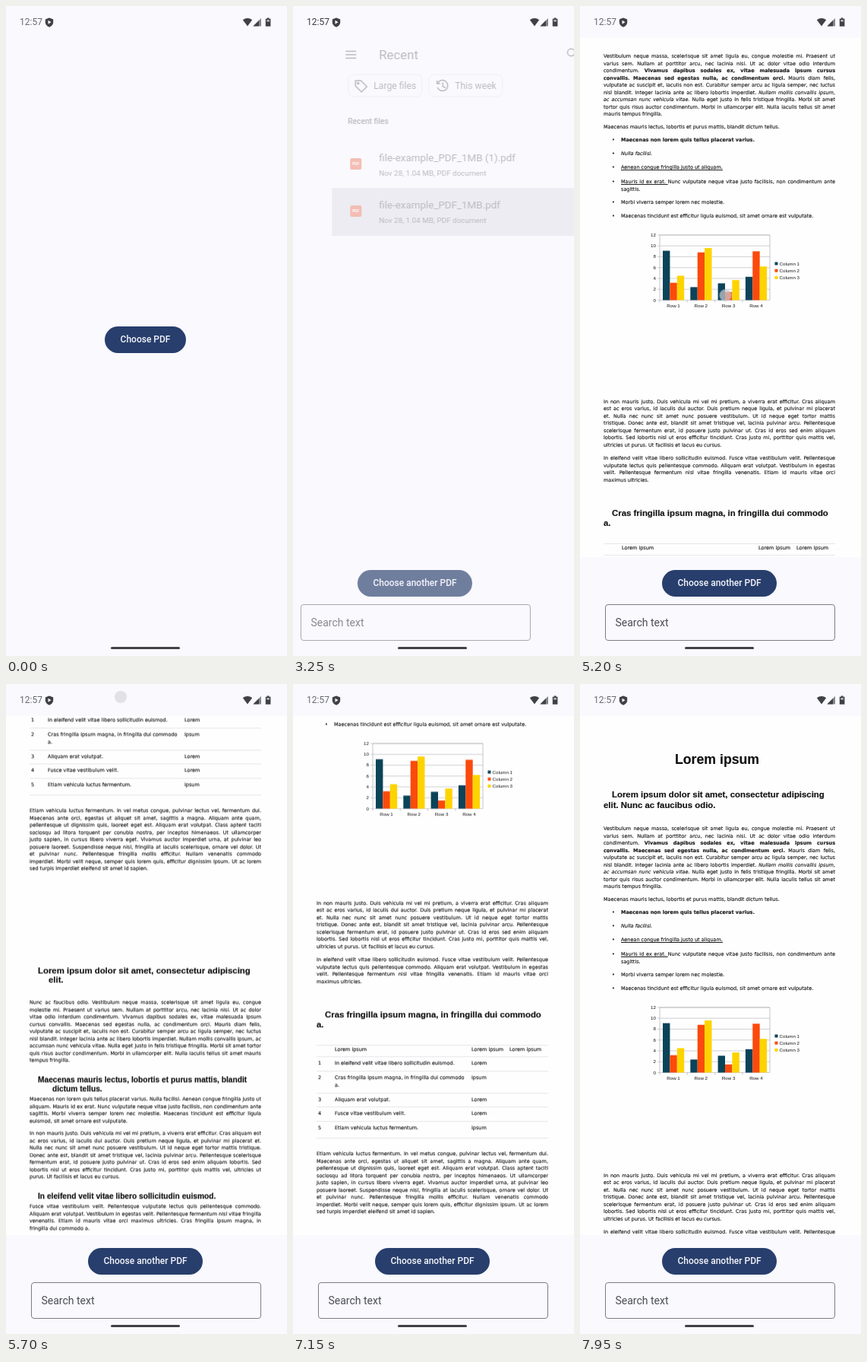
Write an HTML page that moves like this. It is 370 px wide and 854 px high and loops after 8000 ms.

```html
<!DOCTYPE html>
<html lang="en">
<head>
<meta charset="utf-8">
<title>PDF viewer demo</title>
<style>
  :root { --bg: #f9f9fe; --ink: #4c4d55; --navy: #283e6c; }
  html, body { margin: 0; width: 100%; height: 100%; overflow: hidden; background: var(--bg); }
  body { position: relative; font-family: Roboto, sans-serif; color: var(--ink); }
  body * { box-sizing: border-box; }
  svg { position: absolute; left: 0; top: 0; overflow: visible; }
  .layer { position: absolute; left: 0; top: 0; width: 370px; height: 854px; overflow: hidden; }
  .layer, .anim { animation: 8s linear infinite; }

  .button { position: absolute; height: 35px; border-radius: 18px; overflow: hidden;
    background: var(--navy); color: #f4f5fa; font: 500 12px/35px Roboto, sans-serif; text-align: center; }
  .field { position: absolute; left: 32.5px; top: 785.5px; width: 303px; height: 48px; padding-left: 13px;
    border: 1px solid #7d7e86; border-radius: 4px; font-size: 14px; line-height: 46px; }

  #home { background: var(--bg); animation-name: home; }
  #home .button { left: 130px; top: 421px; width: 107px; }
  .ripple { position: absolute; left: 46px; top: 0; width: 40px; height: 40px; border-radius: 50%;
    background: #8a87a0; opacity: 0; animation-name: ripple; }

  #app { animation-name: app; }
  #app .button { left: 108px; top: 741px; width: 151px; }
  #view { position: absolute; left: 0; top: 42px; width: 370px; height: 682px; overflow: hidden;
    background: #fefeff; animation-name: load; animation-timing-function: step-end; }
  #doc { position: absolute; left: 0; top: -42px; width: 370px; animation-name: scroll; }
  #rest { position: absolute; left: 0; top: 0; width: 370px; animation-name: gap; }

  #doc p { position: absolute; margin: 0; white-space: nowrap; color: #1c1c1e;
    font: 6.5px/10px "DejaVu Sans", sans-serif; -webkit-text-stroke: .15px; }
  #doc p.full { text-align: justify; text-align-last: justify; }
  #doc p.flow { white-space: normal; text-align: justify; line-height: 9.5px; }
  #doc p.h { font: bold 11.4px/14px "Liberation Sans", Arial, sans-serif; color: #111; }
  #doc p.sub { font-size: 10.2px; }
  #doc p.title { font-size: 17.7px; line-height: 14px; }
  #doc hr { position: absolute; left: 31px; width: 305px; height: 1px; margin: 0; border: 0; background: #e6e6ea; }

  #files { background: var(--bg); box-shadow: -90px 0 var(--bg); color: #45464e; animation-name: files; }
  #files span { position: absolute; line-height: 20px; white-space: nowrap; }
  .row { position: absolute; left: 0; top: 239px; width: 370px; height: 63px; background: #d3d4dc;
    opacity: 0; animation-name: row; }

  #status { animation-name: status; animation-timing-function: step-end; }
  #status span { position: absolute; left: 18px; top: 11px; font-size: 12px; line-height: 20px; }
  .pill { position: absolute; left: 138px; top: 842px; width: 91px; height: 3px; border-radius: 2px; background: #414248; }
  .touch { position: absolute; left: -8px; top: -8px; width: 16px; height: 16px; border-radius: 50%;
    background: #c9c9d0; opacity: 0; animation-name: touch; }

  @keyframes home {
    0%, 25% { transform: none; opacity: 1; animation-timing-function: cubic-bezier(.2, .6, .1, 1); }
    31.25%, 35% { transform: translateX(-86px); opacity: 1; }
    35.01%, 100% { transform: translateX(-86px); opacity: 0; }
  }
  @keyframes ripple {
    0%, 22.49% { opacity: 0; transform: scale(.6); }
    22.5% { opacity: .3; transform: scale(1); }
    25% { opacity: .3; transform: scale(3.2); }
    28%, 100% { opacity: 0; transform: scale(3.2); }
  }
  @keyframes files {
    0%, 25% { transform: translateX(86px); opacity: 0; animation-timing-function: cubic-bezier(.2, .6, .1, 1); }
    31.25%, 39.375% { transform: none; opacity: 1; }
    40.625% { transform: translateX(51px); opacity: .35; }
    41.6% { transform: translateX(66px); opacity: 0; }
    100% { transform: translateX(86px); opacity: 0; }
  }
  @keyframes row {
    0%, 38.12% { opacity: 0; }
    38.13% { opacity: .5; }
    39%, 45% { opacity: 1; }
    45.01%, 100% { opacity: 0; }
  }
  @keyframes app {
    0%, 35% { opacity: 0; transform: translateX(-86px); }
    35.01%, 39.375% { opacity: 1; transform: translateX(-86px); }
    40.625% { transform: translateX(-23.5px); animation-timing-function: cubic-bezier(.1, .6, .2, 1); }
    45%, 100% { transform: none; opacity: 1; }
  }
  @keyframes load { 0% { opacity: 0; } 46.25%, 100% { opacity: 1; } }
  @keyframes scroll {
    0%, 49.99% { transform: none; }
    50%, 63.75% { transform: translateY(-67px); animation-timing-function: cubic-bezier(.4, .1, .7, .8); }
    71.25% { transform: translateY(-797px); animation-timing-function: ease-out; }
    73.75%, 76.875% { transform: translateY(-870px); animation-timing-function: ease-out; }
    79.375%, 84.375% { transform: translateY(-900px); animation-timing-function: cubic-bezier(.4, .1, .7, .85); }
    89.375% { transform: translateY(-349px); animation-timing-function: cubic-bezier(.1, .6, .4, 1); }
    94.375%, 95.625% { transform: translateY(-200px); animation-timing-function: cubic-bezier(.3, .3, .4, 1); }
    99.375%, 100% { transform: none; }
  }
  @keyframes gap {
    0%, 63.75% { transform: none; }
    71.25%, 95.625% { transform: translateY(-11px); }
    99.375%, 100% { transform: none; }
  }
  @keyframes status { 0% { color: #696a72; } 27.5% { color: #3c3d43; } 41.25%, 100% { color: #696a72; } }
  @keyframes touch {
    0%, 22.49% { opacity: 0; transform: translate(196px, 442px); }
    22.5%, 23.75% { opacity: .7; transform: translate(196px, 442px); }
    23.76%, 49.99% { opacity: 0; transform: translate(195px, 411px); }
    50%, 63.75% { opacity: .75; transform: translate(195px, 411px);
      animation-timing-function: cubic-bezier(.4, .1, .7, .8); }
    71.25%, 72.4% { opacity: .5; transform: translate(151px, 17px); }
    72.5%, 84.37% { opacity: 0; transform: translate(180px, 280px); }
    84.38% { opacity: .7; transform: translate(180px, 280px); }
    87% { opacity: .7; transform: translate(190px, 600px); }
    87.1%, 100% { opacity: 0; transform: translate(190px, 600px); }
  }
</style>
</head>
<body>
<div id="app" class="layer">
  <div id="view" class="anim"><div id="doc" class="anim"><div id="rest" class="anim"></div></div></div>
  <div class="button">Choose another PDF</div>
  <div class="field">Search text</div>
</div>

<div id="home" class="layer">
  <div class="button"><div class="ripple anim"></div><span style="position:relative">Choose PDF</span></div>
</div>

<div id="files" class="layer">
  <div class="row anim"></div>
  <svg width="370" height="310" fill="none" stroke="#45464e" stroke-width="1.5">
    <path d="M18 59.5h14M18 64h14M18 68.5h14"/>
    <circle cx="315" cy="61" r="4.7"/><path d="M318.5 64.5l5 5"/>
    <path d="M351 58.5v2M351 63v2M351 67.5v2" stroke-width="2"/>
    <g stroke="#dcdce4" stroke-width="1"><rect x="21.5" y="90" width="97" height="29" rx="7"/><rect x="127.5" y="90" width="97" height="29" rx="7"/></g>
    <path d="M31 98h7l8 8-7 7-8-8z"/><circle cx="34.5" cy="101.5" r="1"/>
    <path d="M139.5 101a7 7 0 1 1 -.5 6M138.5 98v4h4M146 100.5v5l3.5 2"/>
  </svg>
  <span style="left:62px;top:54px;font-size:16.8px">Recent</span>
  <span style="left:55px;top:95px;font-size:12.2px">Large files</span>
  <span style="left:162px;top:95px;font-size:12.2px">This week</span>
  <span style="left:21px;top:142px;font-size:10.2px;font-weight:500">Recent files</span>
</div>

<div id="status" class="layer">
  <span>12:57</span>
  <svg width="370" height="40" fill="#404147">
    <path d="M57 15.5l5.2 2v4c0 3-2.2 5-5.2 6.2c-3-1.2-5.2-3.2-5.2-6.2v-4z"/>
    <path d="M55.5 18.8l4 2.5-4 2.5z" fill="#f9f9fe"/>
    <path d="M311.8 18.3q6.2-4.6 12.4 0l-6.2 8.2z"/>
    <path d="M336 16v10.5h-10.5z" fill="#84858d"/><path d="M333 19v7.5h-7.5z"/>
    <path d="M343.8 15.5h2.6v1.3h2v10h-6.6v-10h2z"/>
    <path d="M343.3 18.3h3.6v2.2h-3.6z" fill="#c3c4cc"/>
  </svg>
  <div class="pill"></div>
</div>
<div class="touch anim"></div>

<script>
  const $ = id => document.getElementById(id);
  const add = (box, html) => box.insertAdjacentHTML('beforeend', html);
  const doc = $('doc'), rest = $('rest');
  const LEFT = 31, WIDTH = 305;

  // y is the vertical middle of the line
  const line = (box, x, y, text, cls = '', width = 0) => add(box,
    `<p class="${cls}" style="left:${x}px;top:${y - (cls[0] === 'h' ? 7 : 5)}px;${width ? `width:${width}px` : ''}">${text}</p>`);
  const lines = (box, y, list) => list.forEach((text, i) => {
    const last = i === list.length - 1;
    line(box, LEFT, y + i * 9.5, text, last ? '' : 'full', WIDTH);
  });
  const flow = (y, text) => line(rest, LEFT, y, text, 'flow', WIDTH);

  const intro = [
    'Vestibulum neque massa, scelerisque sit amet ligula eu, congue molestie mi. Praesent ut',
    'varius sem. Nullam at porttitor arcu, nec lacinia nisi. Ut ac dolor vitae odio interdum',
    'condimentum. <b>Vivamus dapibus sodales ex, vitae malesuada ipsum cursus</b>',
    '<b>convallis. Maecenas sed egestas nulla, ac condimentum orci.</b> Mauris diam felis,',
    'vulputate ac suscipit et, iaculis non est. Curabitur semper arcu ac ligula semper, nec luctus',
    'nisl blandit. Integer lacinia ante ac libero lobortis imperdiet. <i>Nullam mollis convallis ipsum,</i>',
    '<i>ac accumsan nunc vehicula vitae.</i> Nulla eget justo in felis tristique fringilla. Morbi sit amet',
    'tortor quis risus auctor condimentum. Morbi in ullamcorper elit. Nulla iaculis tellus sit amet',
    'mauris tempus fringilla.'];
  const mauris = [
    'In non mauris justo. Duis vehicula mi vel mi pretium, a viverra erat efficitur. Cras aliquam',
    'est ac eros varius, id iaculis dui auctor. Duis pretium neque ligula, et pulvinar mi placerat',
    'et. Nulla nec nunc sit amet nunc posuere vestibulum. Ut id neque eget tortor mattis',
    'tristique. Donec ante est, blandit sit amet tristique vel, lacinia pulvinar arcu. Pellentesque',
    'scelerisque fermentum erat, id posuere justo pulvinar ut. Cras id eros sed enim aliquam',
    'lobortis. Sed lobortis nisl ut eros efficitur tincidunt. Cras justo mi, porttitor quis mattis vel,',
    'ultricies ut purus. Ut facilisis et lacus eu cursus.'];
  const eleifend = [
    'In eleifend velit vitae libero sollicitudin euismod. Fusce vitae vestibulum velit. Pellentesque',
    'vulputate lectus quis pellentesque commodo. Aliquam erat volutpat. Vestibulum in egestas',
    'velit. Pellentesque fermentum nisl vitae fringilla venenatis. Etiam id mauris vitae orci',
    'maximus ultricies.'];
  const etiam = [
    'Etiam vehicula luctus fermentum. In vel metus congue, pulvinar lectus vel, fermentum dui.',
    'Maecenas ante orci, egestas ut aliquet sit amet, sagittis a magna. Aliquam ante quam,',
    'pellentesque ut dignissim quis, laoreet eget est. Aliquam erat volutpat. Class aptent taciti',
    'sociosqu ad litora torquent per conubia nostra, per inceptos himenaeos. Ut ullamcorper',
    'justo sapien, in cursus libero viverra eget. Vivamus auctor imperdiet urna, at pulvinar leo',
    'posuere laoreet. Suspendisse neque nisl, fringilla at iaculis scelerisque, ornare vel dolor. Ut',
    'et pulvinar nunc. Pellentesque fringilla mollis efficitur. Nullam venenatis commodo',
    'imperdiet. Morbi velit neque, semper quis lorem quis, efficitur dignissim ipsum. Ut ac lorem',
    'sed turpis imperdiet eleifend sit amet id sapien.'];
  const bullets = [
    [300, '<b>Maecenas non lorem quis tellus placerat varius.</b>'],
    [318, '<i>Nulla facilisi.</i>'],
    [336, '<u>Aenean congue fringilla justo ut aliquam. </u>'],
    [355, '<u>Mauris id ex erat. </u>Nunc vulputate neque vitae justo facilisis, non condimentum ante'],
    [382, 'Morbi viverra semper lorem nec molestie.'],
    [400, 'Maecenas tincidunt est efficitur ligula euismod, sit amet ornare est vulputate.']];
  const heading = 'Lorem ipsum dolor sit amet, consectetur adipiscing';
  const plain = list => list.join(' ').replace(/<[^>]+>/g, '');

  // First page
  line(doc, 125, 99, 'Lorem ipsum', 'h title');
  line(doc, 42, 145, heading, 'h');
  line(doc, LEFT, 158.5, 'elit. Nunc ac faucibus odio.', 'h');
  lines(doc, 190, intro);
  line(doc, LEFT, 283, 'Maecenas mauris lectus, lobortis et purus mattis, blandit dictum tellus.');
  for (const [y, text] of bullets) {
    line(doc, 42, y, '•');
    line(doc, 54, y, text, y === 355 ? 'full' : '', y === 355 ? 282 : 0);
  }
  line(doc, 54, 365, 'sagittis.');

  // Bar chart
  const colors = ['#0b4359', '#fb4a0c', '#fdd400'];
  const rows = [[9.1, 3.2, 4.5], [2.4, 8.8, 9.6], [3.1, 1.5, 3.7], [4.3, 9, 6.2]];
  const base = 510.5, unit = 7.13;
  const rect = (x, y, w, h, c) => `<rect x="${x}" y="${y}" width="${w}" height="${h}" fill="${c}"/>`;
  const label = (x, y, t, anchor) => `<text x="${x}" y="${y + 2}" text-anchor="${anchor}">${t}</text>`;
  let chart = '';
  for (let v = 0; v <= 12; v += 2) {
    const y = base - v * unit;
    chart += `<path d="M102 ${y}H250" stroke="#c4c4c8" stroke-width=".8"/>` + label(100, y, v, 'end');
  }
  chart += `<path d="M105 ${base}V${base - 12 * unit}H250V${base}M105 ${base}v3M141.3 ${base}v3M177.6 ${base}v3M213.9 ${base}v3" fill="none" stroke="#b8b8bc" stroke-width=".8"/>`;
  rows.forEach((vals, r) => {
    vals.forEach((v, i) => chart += rect(109 + r * 36.3 + i * 9.4, base - v * unit, 9.4, v * unit, colors[i]));
    chart += label(123 + r * 36.3, 518, `Row ${r + 1}`, 'middle');
  });
  colors.forEach((c, i) => {
    const y = 462.5 + i * 9.2;
    chart += rect(256.5, y - 2, 4, 4, c) + label(262.5, y, `Column ${i + 1}`, 'start');
  });
  add(doc, `<svg width="370" height="540" font-family="Liberation Sans, Arial, sans-serif" font-size="6.2" fill="#111">${chart}</svg>`);

  // Second page
  lines(rest, 645.5, mauris);
  lines(rest, 720, eleifend);
  line(rest, 42, 792, 'Cras fringilla ipsum magna, in fringilla dui commodo', 'h');
  line(rest, LEFT, 805, 'a.', 'h');
  for (const y of [832, 847, 866, 895, 913, 932, 954]) add(rest, `<hr style="top:${y}px">`);
  const table = [
    [838, '', 'Lorem ipsum', 'Lorem ipsum', 'Lorem ipsum'],
    [856, 1, 'In eleifend velit vitae libero sollicitudin euismod.', 'Lorem', ''],
    [875, 2, 'Cras fringilla ipsum magna, in fringilla dui commodo', 'ipsum', ''],
    [885, '', 'a.', '', ''],
    [904, 3, 'Aliquam erat volutpat.', 'Lorem', ''],
    [922, 4, 'Fusce vitae vestibulum velit.', 'Lorem', ''],
    [941, 5, 'Etiam vehicula luctus fermentum.', 'ipsum', '']];
  for (const [y, ...cells] of table)
    cells.forEach((text, i) => text && line(rest, [33, 55, 235, 285][i], y, text));
  lines(rest, 975, etiam);

  // Third page
  line(rest, 42, 1185, heading, 'h');
  line(rest, 56, 1197, 'elit.', 'h');
  flow(1228, 'Nunc ac faucibus odio. ' + plain(intro));
  line(rest, 42, 1329, 'Maecenas mauris lectus, lobortis et purus mattis, blandit', 'h sub');
  line(rest, 61, 1341, 'dictum tellus.', 'h sub');
  flow(1355, plain(bullets.map(b => b[1] + (b[0] === 355 ? ' sagittis.' : ''))));
  flow(1400, plain(mauris));
  line(rest, 42, 1482, 'In eleifend velit vitae libero sollicitudin euismod.', 'h sub');
  flow(1496, plain(eleifend).split('euismod. ')[1] + ' Cras fringilla ipsum magna, in fringilla dui commodo a.');
  flow(1541, plain(etiam));

  // File list
  [['file-example_PDF_1MB (1).pdf', 200], ['file-example_PDF_1MB.pdf', 262]].forEach(([name, y]) => add($('files'), `
    <span style="left:24px;top:${y}px;width:15px;height:15px;border-radius:2px;background:#e8502a;color:#fff;font:bold 5px/15px Roboto,sans-serif;text-align:center">PDF</span>
    <span style="left:62px;top:${y - 10}px;font-size:13.4px">${name}</span>
    <span style="left:62px;top:${y + 9.5}px;font-size:9.9px">Nov 28, 1.04 MB, PDF document</span>`));
</script>
</body>
</html>
```
